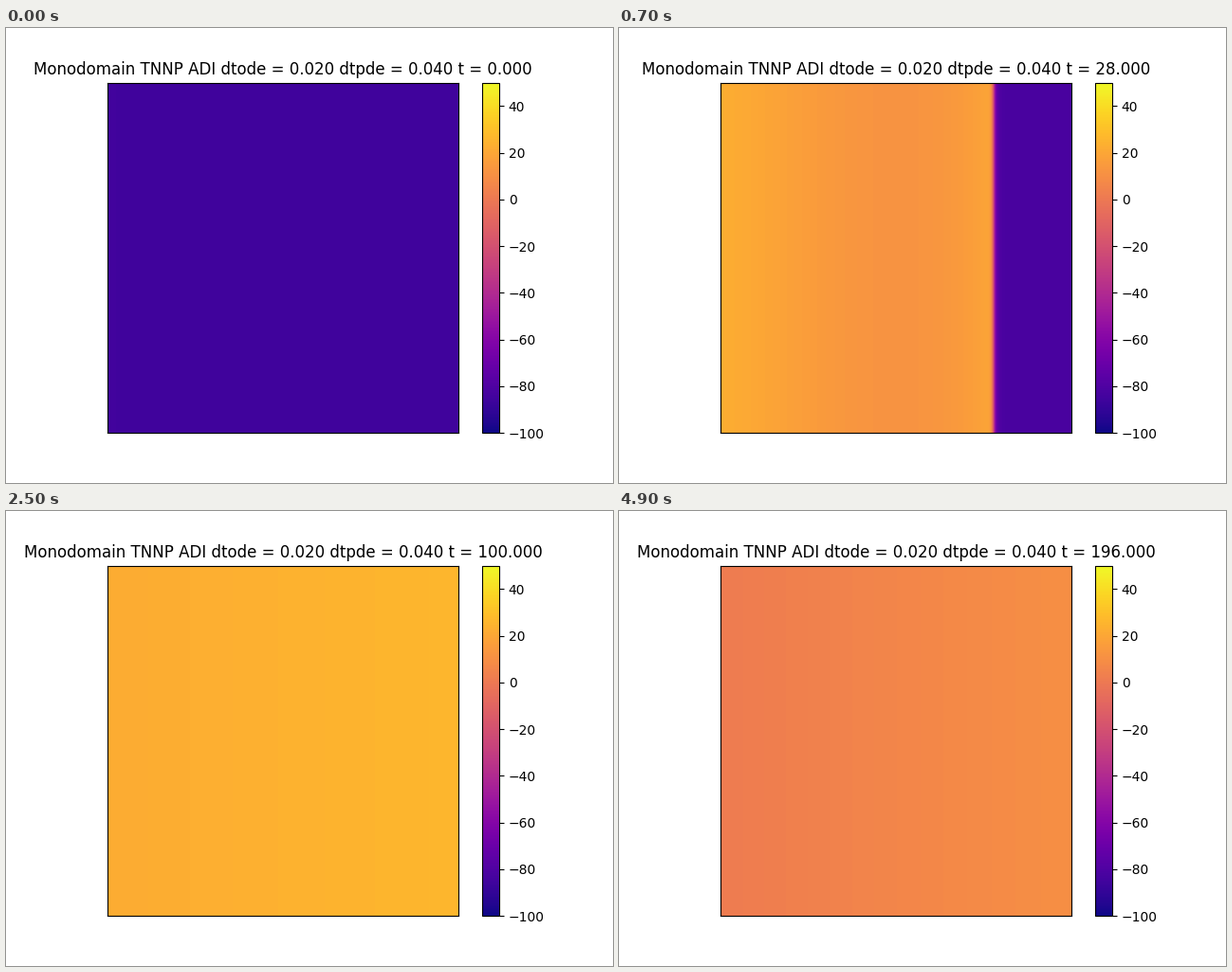
A matplotlib script that plays this animation: 640 by 480 pixels, repeating every 5000 ms.

```python
import numpy as np
import matplotlib.pyplot as plt
from matplotlib.animation import FuncAnimation

FRAMES, INTERVAL = 50, 100
DT = 4.0            # model time per frame, ms
SPEED = 0.02838     # domain widths per ms
ONSET = 0.58        # delay before the wave leaves the left edge
RISE = 0.12         # upstroke time constant, ms
STIMULUS = 0.025    # width of the stimulated strip

x = (np.arange(370) + 0.5) / 370
edge = 1 - x
# The front speeds up as it meets the sealed right edge
arrival = ONSET + x / SPEED - 0.9 * np.exp(-edge / 0.03)


def action_potential(age):
    """Voltage in mV, a given time after activation: spike, notch and dome."""
    dome = 30.1 - 0.0163 * age - 0.00067 * age**2
    notch = 17.9 * np.exp(-((age - 9) / 18) ** 2)
    spike = 4 * np.exp(-age / 3)
    return dome - notch + spike


def voltage(t):
    rest = -85.2 + 0.14 * min(t, 20) + (x < STIMULUS)
    if t == 0:
        return np.tile(rest, (2, 1))
    age = t - arrival
    behind = np.maximum(age, 0)
    excited = action_potential(behind) + 13 * np.exp(-edge / 0.025 - behind / 3)
    foot = 14 * np.exp(np.minimum(age, 0) / 0.35)
    upstroke = 1 / (1 + np.exp(-np.clip(age / RISE, -50, 50)))
    v = (rest + foot) * (1 - upstroke) + excited * upstroke
    return np.tile(v, (2, 1))


fig, ax = plt.subplots(figsize=(6.4, 4.8), dpi=100)
image = ax.imshow(voltage(0), cmap="plasma", vmin=-100, vmax=50,
                  extent=(0, 1, 0, 1), interpolation="nearest")
ax.set_xticks([])
ax.set_yticks([])
fig.colorbar(image, ax=ax)
title = ax.set_title("")


def update(i):
    t = i * DT
    image.set_data(voltage(t))
    title.set_text(f"Monodomain TNNP ADI dtode = 0.020 dtpde = 0.040 t = {t:.3f}")
    return image, title


anim = FuncAnimation(fig, update, frames=FRAMES, interval=INTERVAL,
                     repeat=True, repeat_delay=0)
plt.show()
```
